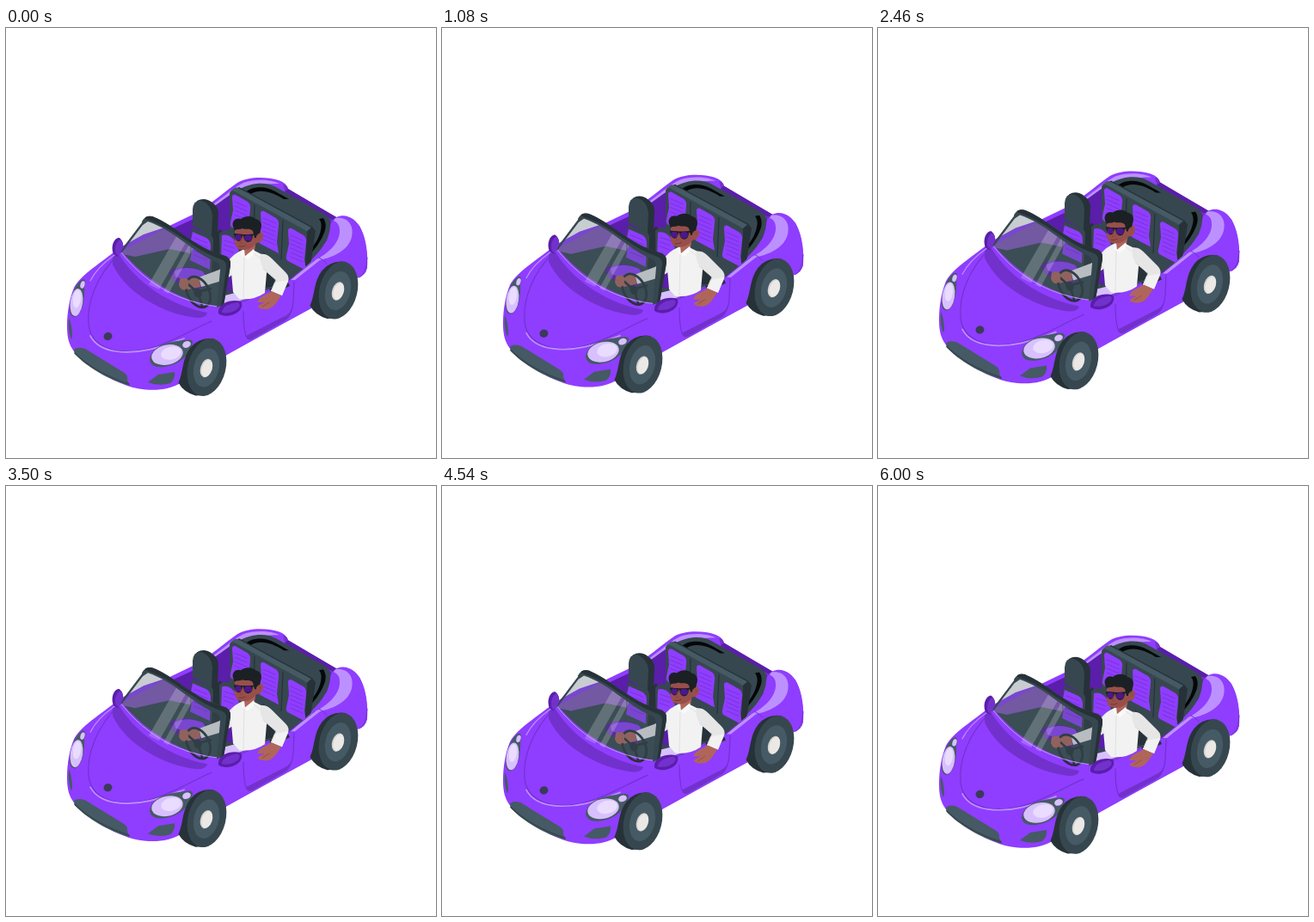
Write an HTML page with a canvas that moves like this. It is 500x500 px and loops after 6.04 s.

```html
<!DOCTYPE html>
<html>
<head>
<meta charset="utf-8">
<style>
html,body{margin:0;width:100%;height:100%;overflow:hidden;background:#fff}
canvas{display:block;width:500px;height:500px}
</style>
</head>
<body>
<canvas id="stage" width="500" height="500"></canvas>
<script>
const ctx = document.getElementById('stage').getContext('2d');
const LOOP = 6040, RISE = 9.3;
const BODY = '#8f3dff', DEEP = '#7231cc', SHADE = '#5a1eaa', LIGHT = '#bd90ff', PALE = '#d8c0ff';
const INK = '#263238', DARK = '#37474f', SLATE = '#455a64';
const FACE = '#984f4b', HAND = '#b0655b', CREASE = '#824842', HAIR = '#1b2024';

// Scene parts, back to front
const parts = [];
const add = draw => parts.push(draw);
function fill(d, color) {
  const p = new Path2D(d);
  add(() => { ctx.fillStyle = color; ctx.fill(p); });
}
function line(d, color, width = 1) {
  const p = new Path2D(d);
  add(() => { ctx.strokeStyle = color; ctx.lineWidth = width; ctx.stroke(p); });
}
function oval(x, y, rx, ry, deg, color, width = 0) {
  const p = new Path2D();
  p.ellipse(x, y, rx, ry, deg * Math.PI / 180, 0, Math.PI * 2);
  add(() => {
    ctx.fillStyle = ctx.strokeStyle = color;
    ctx.lineWidth = width;
    if (width) ctx.stroke(p); else ctx.fill(p);
  });
}

function wheel(x, y) {
  fill(`M${x - 33} ${y + 18}c6 -13 4 -28 14 -41q11 -13 28 -10l-7 65l-15 1q-14 -4 -20 -15z`, INK);
  oval(x, y, 22, 34, 14, DARK);
  oval(x - .5, y + .5, 14.5, 23, 14, SLATE);
  oval(x - .5, y + 1, 6.8, 11, 18, '#d5d2cf');
  oval(x + .2, y + 1.2, 5.8, 10, 18, '#ebe8e5');
}

function cushion(x, y) {
  fill(`M${x + 1} ${y + 3}Q${x + 1} ${y - 1} ${x + 5} ${y}L${x + 19} ${y + 8}Q${x + 23} ${y + 11} ${x + 22} ${y + 17}` +
    `L${x + 20} ${y + 36}L${x + 22} ${y + 49}L${x + 1} ${y + 38}Q${x - 2} ${y + 36} ${x - 1} ${y + 32}L${x + 2} ${y + 18}Z`, BODY);
  for (let i = 0; i < 6; i++) {
    const top = y + 8 + i * 5;
    line(`M${x + 4} ${top}L${x + 18} ${top + 6}`, DEEP, .8);
  }
}

function body() {
  fill('M71 347C71 330 74 314 79 302C87 287 109 274 133 255L160 240L190 230L217 217C240 204 254 190 269 180' +
    'C282 172 304 173 317 177Q326 180 328 187L384 220C396 215 407 222 413 234C419 246 421 263 420 278' +
    'Q419 288 408 291L356 325L257 380L204 412C187 424 158 422 141 416C119 408 86 389 77 373C72 365 71 356 71 347Z', BODY);
  fill('M322 181Q328 183 328 188L384 220L378 226L326 196Z', DEEP);
  fill('M328 187L384 220L379 223L324 190Z', SHADE);
  fill('M226 215C246 203 262 187 276 180C290 175 308 176 318 181C300 181 285 183 273 188C258 198 244 208 226 215Z', LIGHT);
}

function cabin() {
  fill('M133 262L190 235L218 222C240 210 257 196 269 188L300 182L330 193L378 225L373 247L354 271L331 292L276 320L247 324C207 322 164 302 133 262Z', SHADE);
  fill('M136 262L192 252L246 268L294 246L352 275L330 292L275 319L248 323C210 320 168 300 136 262Z', DARK);
  // Folded roof
  fill('M270 188C284 180 302 178 314 185L371 217Q379 222 377 231C376 247 365 261 349 275L340 240Z', DARK);
  fill('M277 192C287 183 302 184 313 190L329 199L323 199C309 190 294 186 283 194Z', '#050708');
  fill('M369 221Q373 227 371 235C367 248 358 259 348 269L348 264C358 254 364 245 366 235Q368 227 364 222Z', '#050708');
  // Rear bench
  fill('M262 189L271 185L356 231L360 236L354 276L346 282L262 236Z', INK);
  fill('M264 187Q267 184 272 187L355 232L348 238L261 191Z', SLATE);
  fill('M260 192Q261 188 266 190L346 234Q351 236 350 242L347 283L260 240Z', DARK);
  cushion(262, 194);
  cushion(295, 213);
  cushion(327, 233);
  line('M289 206L288 253M322 224L320 269', INK, 1.2);
  fill('M299 260Q307 268 306 281L315 300L301 302Z', INK);
}

function frontSeats() {
  fill('M222 201Q231 196 240 203Q247 208 247 216L246 239L238 243L217 226Z', INK);
  fill('M217 211Q218 199 228 201Q239 206 240 218L239 242L217 230Z', DARK);
  fill('M240 242L249 234L253 239L251 291L238 287Z', INK);
  fill('M216 232L236 240Q242 243 241 249L239 287L212 274Z', DARK);
  fill('M217 237L233 244Q238 247 238 254L237 281L214 270Q217 256 215 247Z', BODY);
  for (let i = 0; i < 5; i++) line(`M219 ${244 + i * 5}L234 ${250 + i * 5}`, DEEP, .8);
  fill('M190 283Q208 272 231 284L238 297L220 306L193 293Z', SHADE);
  fill('M196 283Q209 275 229 283L234 291L218 298L197 289Z', BODY);
  // Driver's seat
  fill('M248 239Q256 232 266 238L278 251L272 310L249 296Z', DARK);
  fill('M251 241Q258 239 265 246L271 259L261 270L250 270Z', BODY);
  line('M254 247L267 251M253 252L265 256M253 257L264 261', DEEP, .8);
  fill('M253 290L265 282L265 306L254 305Z', SHADE);
}

function shell() {
  // Near door and rear wing
  fill('M247 324L274 317L300 306L330 293L355 272L374 253Q381 241 381 224Q397 214 411 230Q421 250 420 280L402 283L355 326L257 379L242 336Z', BODY);
  fill('M383 221C398 219 405 230 402 243C398 259 381 266 365 270L336 293L331 293L355 272C373 264 389 250 388 235Q388 227 381 224Z', LIGHT);
  fill('M247 313L274 306L278 315L262 321L247 324Z', PALE);
  line('M274 319L302 307L330 293L359 270', DEEP, 1);
  line('M276 329Q276 348 279 358Q281 363 287 359L326 337Q333 333 334 318L335 295', DEEP, 1.1);
  line('M364 267Q370 270 373 274', DEEP, 1);
  fill('M281 357L326 334Q331 331 333 324Q331 337 325 340L286 362Q280 364 279 358Z', DEEP);
  line('M411 290Q419 286 420 267', DEEP, 1);
}

function nose() {
  // Cowl and bonnet
  fill('M133 258C167 298 207 319 250 324L250 342L202 371L123 334L123 268Z', BODY);
  fill('M124 265L132 264C156 302 197 324 234 331Q233 337 222 337C184 333 140 309 124 275Z', DEEP);
  line('M131 263C104 289 94 321 96 344Q98 369 128 375C171 382 211 352 239 341', DEEP, 1.1);
  line('M98 358Q106 373 128 376C157 380 182 370 207 361', LIGHT, 1.7);
  line('M126 264Q106 278 98 294', LIGHT, 1.2);
  oval(118.5, 358.5, 5, 4.6, -20, '#3b3a58');
  // Lights
  fill('M167 386C169 370 186 365 207 363Q218 361 217 366C214 379 204 391 184 394Q169 396 167 386Z', SLATE);
  oval(187.5, 380, 18.5, 11.5, -13, PALE);
  oval(192, 378, 12, 7.5, -13, '#e9dcff');
  oval(210, 368, 5, 3.7, -22, PALE);
  fill('M74 329C74 313 81 295 90 292Q94 294 91 302C92 318 88 333 80 336Q75 336 74 329Z', SLATE);
  oval(82, 319, 7.2, 16, 8, PALE);
  oval(82.5, 315, 4.6, 10.5, 8, '#e9dcff');
  oval(89, 298.5, 2.5, 4.3, 16, PALE);
  // Intakes
  fill('M79 374Q83 370 92 373L136 400Q142 403 141 409L144 416C119 409 94 394 80 379Z', SLATE);
  line('M80 378C94 392 116 405 143 414', DARK, 1.6);
  fill('M165 412L177 403L196 400Q197 408 191 413Q178 417 165 412Z', SLATE);
  fill('M73 337Q77 345 77 359L76 362Q72 354 73 337Z', SLATE);
}

function driver() {
  // Reaching arm
  fill('M268 262C259 267 256 276 248 281L224 290L227 301L254 293L271 282Z', '#e8e8e8');
  fill('M225 290L211 291Q203 291 202 298Q201 304 208 305L226 301Z', HAND);
  // Torso
  fill('M275 258Q263 263 261 272L264 307L271 315Q288 317 301 308L303 285Q310 270 299 264L289 259Z', '#f2f2f2');
  fill('M276 247L291 245L289 259L278 266Z', HAND);
  fill('M276 256L277 266L288 257L290 262L281 269L274 264Z', '#fafafa');
  line('M277 267L276 314M288 262L296 268', '#dcdcdc', .8);
  // Head
  fill('M266 232Q270 225 281 225L292 231L293 239Q299 235 299 242Q298 250 291 250C286 258 278 259 271 257Q266 255 266 248Z', FACE);
  fill('M264 231C262 224 268 220 273 222C279 217 288 219 290 222C297 223 298 230 296 234L295 239Q291 239 291 244L289 244L287 236C283 232 279 235 275 233C271 235 267 233 266 236Z', HAIR);
  line('M266 240L278 241L292 240', HAIR, 1.6);
  fill('M265 239L275 240Q275 248 270 248Q266 247 265 239Z', HAIR);
  fill('M276 240L287 240Q287 249 281 249Q276 248 276 240Z', HAIR);
  oval(270, 243.5, 3.8, 3.4, 0, '#4d168f');
  oval(281.5, 244, 4.4, 3.6, 0, '#4d168f');
  line('M274 244L272 250L275 250M294 241Q297 240 296 244', CREASE, .8);
  line('M271 254Q275 255 278 253', '#71332f', .9);
}

function steering() {
  oval(223.5, 307, 12.5, 19, -28, INK, 2.8);
  oval(223, 308, 4.5, 5.5, -25, INK);
  line('M212 298L222 307L238 303M224 310L228 323', INK, 2.6);
  fill('M202 292Q208 289 213 294L211 303Q204 306 201 299Z', HAND);
}

function screen() {
  fill('M134 260L190 230L214 247L214 262L190 257L150 266L136 263Z', '#8558bd');
  fill('M134 259L162 223C190 231 219 256 252 269L247 324C207 320 164 299 134 259Z', 'rgba(69,90,100,.3)');
  fill('M200 239L211 246L178 304L166 298Z', 'rgba(255,255,255,.2)');
  fill('M215 248L220 252L189 309L183 306Z', 'rgba(255,255,255,.2)');
  line('M134 261C164 300 206 320 248 324', 'rgba(210,195,230,.7)', 1);
  line('M134 260L162 223', DARK, 2.4);
  fill('M158 225Q163 216 172 220C196 229 217 254 252 264Q262 266 261 276L253 323L245 325L249 282Q250 275 244 272C218 261 195 235 165 225L159 229Z', DARK);
  fill('M162 220Q168 217 175 221C199 232 219 255 252 264Q262 266 261 276L253 323L250 324L256 279Q257 271 250 269C218 258 196 232 162 222Z', INK);
}

function mirrors() {
  fill('M125 263C121 254 126 243 132 244Q137 248 136 256L130 266Z', SHADE);
  fill('M128 263C125 255 129 247 133 246Q137 249 136 256L131 265Z', DEEP);
  fill('M247 329C248 320 262 315 273 318Q276 322 272 328C266 335 253 337 247 332Z', SHADE);
  fill('M251 329Q254 321 269 319Q274 321 270 326Q262 333 251 331Z', DEEP);
}

function restingArm() {
  fill('M306 303L328 296L330 300L309 309Z', INK);
  fill('M296 263Q303 262 309 268L325 284Q330 289 328 295L321 311L308 306L314 293L300 281Q294 272 296 263Z', '#e6e6e6');
  fill('M312 296L328 293L321 311L308 306Z', '#f2f2f2');
  line('M299 280L314 293L309 305', '#d7d7d7', .9);
  fill('M309 306L320 311L314 320Q308 328 300 327Q292 326 293 323L301 319L292 319Q294 313 302 310Z', HAND);
  line('M298 324L306 319', CREASE, .7);
}

body();
cabin();
frontSeats();
shell();
nose();
driver();
steering();
screen();
mirrors();
restingArm();
wheel(386.5, 305);
wheel(233.5, 394.5);

ctx.lineCap = ctx.lineJoin = 'round';

function frame(now) {
  const p = (now % LOOP) / LOOP;
  const lift = RISE * (1 - Math.abs(1 - 2 * p));
  ctx.setTransform(1, 0, 0, 1, 0, 0);
  ctx.fillStyle = '#fff';
  ctx.fillRect(0, 0, 500, 500);
  ctx.translate(0, -lift);
  for (const draw of parts) draw();
}

const start = performance.now();
function tick() {
  frame(performance.now() - start);
  requestAnimationFrame(tick);
}
tick();
</script>
</body>
</html>
```
